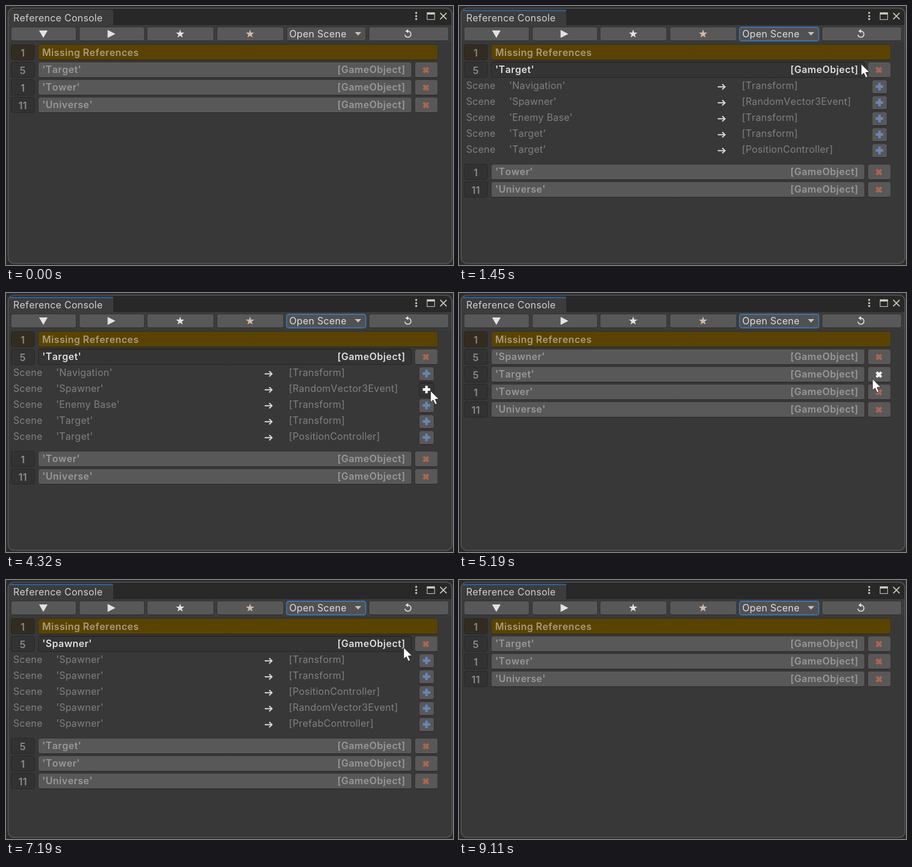
An HTML page with a canvas that plays this animation: 838 px wide and 487 px high, repeating every 9.85 s.

```html
<!DOCTYPE html>
<html lang="en">
<head>
<meta charset="utf-8">
<title>Reference Console</title>
<style>
html, body { margin: 0; width: 100%; height: 100%; overflow: hidden; background: #2b2b2b; }
canvas { display: block; }
</style>
</head>
<body>
<canvas id="stage" width="838" height="487"></canvas>
<script>
const ctx = document.getElementById('stage').getContext('2d');
const LOOP = 9850;
const WHITE = '#dedede', DIM = '#989898', SUB = '#808080';

// Pointer moves: start, end, steps, target x, target y
const START = [838, 116];
const MOVES = [
  [720, 1180, 8, 754, 109],
  [2180, 2650, 7, 749, 179],
  [3050, 3590, 8, 795, 183],
  [3790, 3920, 2, 796, 184],
  [4980, 5450, 7, 743, 127],
  [7190, 7660, 6, 778, 127],
  [8840, 9110, 5, 844, 139]
];

// Clicks: down, end of highlight, release
const CLICKS = [
  [1320, 1450, 1450],
  [4190, 4320, 4450],
  [5590, 5660, 5660],
  [7930, 8060, 8200]
];

const BASE_ROWS = [['Target', 5], ['Tower', 1], ['Universe', 11]];
const MORE_ROWS = [['Spawner', 5], ...BASE_ROWS];
const TARGET_REFS = [
  ['Navigation', 'Transform'],
  ['Spawner', 'RandomVector3Event'],
  ['Enemy Base', 'Transform'],
  ['Target', 'Transform'],
  ['Target', 'PositionController']
];
const SPAWNER_REFS = ['Transform', 'Transform', 'PositionController',
  'RandomVector3Event', 'PrefabController'].map(type => ['Spawner', type]);

function listAt(t) {
  if (t < 1450 || t >= 8200) return { rows: BASE_ROWS, refs: [] };
  if (t < 4450) return { rows: BASE_ROWS, refs: TARGET_REFS };
  return { rows: MORE_ROWS, refs: t < 5660 ? [] : SPAWNER_REFS };
}

function pointerAt(t) {
  let [x, y] = START;
  for (const [from, to, steps, tx, ty] of MOVES) {
    if (t < from) break;
    const step = Math.min(steps, 1 + Math.floor((t - from) / (to - from) * (steps - 1) + 1e-6));
    const p = step / steps, e = p * p * (3 - 2 * p);
    x += (tx - x) * e;
    y += (ty - y) * e;
  }
  return { x, y, shown: t >= MOVES[0][0] && t < 9110 };
}

function box(x, y, w, h, r, fill, stroke, line = 1) {
  ctx.beginPath();
  ctx.roundRect(x, y, w, h, r);
  if (fill) { ctx.fillStyle = fill; ctx.fill(); }
  if (stroke) { ctx.strokeStyle = stroke; ctx.lineWidth = line; ctx.stroke(); }
}

function poly(points, fill) {
  ctx.beginPath();
  points.forEach(([x, y]) => ctx.lineTo(x, y));
  ctx.closePath();
  ctx.fillStyle = fill;
  ctx.fill();
}

function stroke(color, width, ...segments) {
  ctx.beginPath();
  for (const [x1, y1, x2, y2] of segments) {
    ctx.moveTo(x1, y1);
    ctx.lineTo(x2, y2);
  }
  ctx.strokeStyle = color;
  ctx.lineWidth = width;
  ctx.stroke();
}

function disc(x, y, r, fill) {
  ctx.beginPath();
  ctx.arc(x, y, r, 0, Math.PI * 2);
  ctx.fillStyle = fill;
  ctx.fill();
}

function text(str, x, y, color, bold = false, align = 'left') {
  ctx.font = `${bold ? 600 : 400} 18px Inter, sans-serif`;
  ctx.letterSpacing = bold ? '0.5px' : '0.3px';
  ctx.fontKerning = 'none';
  ctx.textAlign = align;
  ctx.fillStyle = color;
  ctx.fillText(str, x, y);
}

function button(x, y, w, h, down = false, fill = '#585858') {
  box(x - 0.5, y - 0.5, w + 1, h + 1, 4, down ? '#343434' : fill, down ? '#242424' : '#303030');
  const edge = down ? y - 0.5 : y + h + 0.5;
  stroke(down ? '#151515' : '#222', 1, [x + 2, edge, x + w - 2, edge]);
}

function star(cx, cy, r, color) {
  const points = Array.from({ length: 10 }, (_, i) => {
    const a = i * Math.PI / 5 - Math.PI / 2, d = i % 2 ? r * 0.4 : r;
    return [cx + d * Math.cos(a), cy + d * Math.sin(a)];
  });
  poly(points, color);
}

function cross(cx, cy, color) {
  const d = 4.6;
  stroke(color, 4.8, [cx - d, cy - d, cx + d, cy + d], [cx - d, cy + d, cx + d, cy - d]);
}

function plus(cx, cy, color) {
  stroke(color, 4.8, [cx - 7, cy, cx + 7, cy], [cx, cy - 7, cx, cy + 7]);
}

function arrow(x, y) {
  stroke('#d6d6d6', 2.2, [x, y, x + 12, y]);
  ctx.beginPath();
  ctx.moveTo(x + 8.5, y - 5);
  ctx.lineTo(x + 13.5, y);
  ctx.lineTo(x + 8.5, y + 5);
  ctx.lineWidth = 2.4;
  ctx.stroke();
}

function drawWindow(focused) {
  ctx.fillStyle = '#2b2b2b';
  ctx.fillRect(0, 0, 838, 487);
  box(4, 4, 832, 480, 11, '#383838');
  ctx.save();
  ctx.clip();
  ctx.fillStyle = '#282828';
  ctx.fillRect(4, 4, 832, 32);
  box(4, 7, 197, 31, [4, 4, 0, 0], '#3c3c3c');
  ctx.fillStyle = '#3c3c3c';
  ctx.fillRect(4, 36, 832, 32);
  if (focused) box(5, 7, 196, 3, [2, 2, 0, 0], '#2c5d87');
  ctx.restore();
  box(4, 4, 832, 480, 11, null, '#505050', 2);
  text('Reference Console', 13.5, 29, '#d0d0d0');

  const tint = '#ccc8b8';
  [13, 19, 24.5].forEach(y => disc(769, y, 1.9, tint));
  ctx.strokeStyle = tint;
  ctx.lineWidth = 1.2;
  ctx.strokeRect(789.5, 12.5, 14, 13);
  ctx.fillStyle = tint;
  ctx.fillRect(789, 12, 15, 4);
  stroke(tint, 1.8, [814, 13, 826, 25], [826, 13, 814, 25]);
}

function drawToolbar(focused) {
  [[10, 121], [138, 121], [265, 124], [396, 124], [681, 148]].forEach(([x, w]) => button(x, 40, w, 25));
  button(527, 40, 147, 25, false, '#515151');
  if (focused) box(526, 40, 148.5, 25.5, 4, null, '#3a79bb', 1.8);

  const ink = '#e2e2e2';
  poly([[62, 46], [78, 46], [70, 60]], ink);
  poly([[190.5, 45], [205, 52.5], [190.5, 60]], ink);
  star(326.5, 52.6, 8.3, ink);
  star(457.5, 52.6, 8.3, '#d2b9a8');
  text('Open Scene', 531, 59, '#dedede');
  poly([[654, 49], [666, 49], [660, 55.5]], '#c4c4ba');

  ctx.beginPath();
  ctx.arc(753.5, 53, 5.7, -Math.PI / 2, Math.PI * 0.95);
  ctx.strokeStyle = ink;
  ctx.lineWidth = 1.8;
  ctx.stroke();
  poly([[748.5, 47.3], [754, 43.5], [754, 51]], ink);
}

function countBox(n, y, fill, color) {
  box(9.5, y - 0.5, 44, 29, 4, fill, '#262626');
  text(n, 31.5, y + 22, color, true, 'center');
}

function drawList(list, pointer, pressed) {
  const inside = (x, y, w, h) => pointer.shown &&
    pointer.x >= x && pointer.x < x + w && pointer.y >= y && pointer.y < y + h;

  countBox(1, 73, '#322c20', '#8f867a');
  button(61, 73, 748, 28, false, '#5a4300');
  text('Missing References', 67.7, 94, '#a99b7c', true);

  let y = 106;
  list.rows.forEach(([name, count], i) => {
    const open = i === 0 && list.refs.length > 0;
    const over = inside(61, y - 1, 700, 30);
    const down = over && pressed;
    const color = open || (over && !down) ? WHITE : DIM;
    countBox(count, y, '#323232', '#8c8c8c');
    button(61, y, 699, 28, open || down);
    text(`'${name}'`, 68, y + 20, color, true);
    text('[GameObject]', 748.7, y + 20, color, true, 'right');

    const overCross = inside(767, y - 1, 42, 30);
    button(767, y, 42, 28, overCross && pressed);
    cross(787.2, y + 14.5, overCross ? '#f4f4f4' : '#aa654e');
    y += 33;
    if (!open) return;

    list.refs.forEach(([owner, type], k) => {
      const top = y + k * 30;
      text('Scene', 13.5, top + 17, SUB);
      text(`'${owner}'`, 94, top + 17, SUB);
      arrow(485, top + 13);
      text(`[${type}]`, 530.3, top + 17, inside(528, top - 3, 242, 30) ? WHITE : SUB);
      const overPlus = inside(774, top, 29, 27);
      button(775, top + 0.5, 27, 25, overPlus && pressed);
      plus(788.3, top + 12.5, overPlus ? '#f4f4f4' : '#6685b6');
    });
    y += list.refs.length * 30 + 9;
  });
}

function drawPointer({ x, y }) {
  const shape = [[0, 0], [0, 21.5], [4.8, 17.2], [8.6, 25.5], [12.2, 23.9], [8.6, 15.8], [15.5, 15.6]];
  poly(shape.map(([dx, dy]) => [x + dx, y + dy]), '#fff');
  ctx.strokeStyle = '#1c1c1c';
  ctx.lineWidth = 0.9;
  ctx.stroke();
}

function draw(t) {
  const focused = t >= CLICKS[0][0];
  const click = CLICKS.find(([down, , up]) => t >= down && t < up);
  const pointer = pointerAt(t);
  drawWindow(focused);
  drawToolbar(focused);
  drawList(listAt(t), pointer, !!click);
  if (click && t < click[1]) disc(pointer.x - 1, pointer.y, 18, 'rgba(205,190,8,0.75)');
  if (pointer.shown) drawPointer(pointer);
}

const begin = performance.now();
function tick(now) {
  draw(Math.max(0, now - begin) % LOOP);
  requestAnimationFrame(tick);
}
draw(0);
requestAnimationFrame(tick);
</script>
</body>
</html>
```
